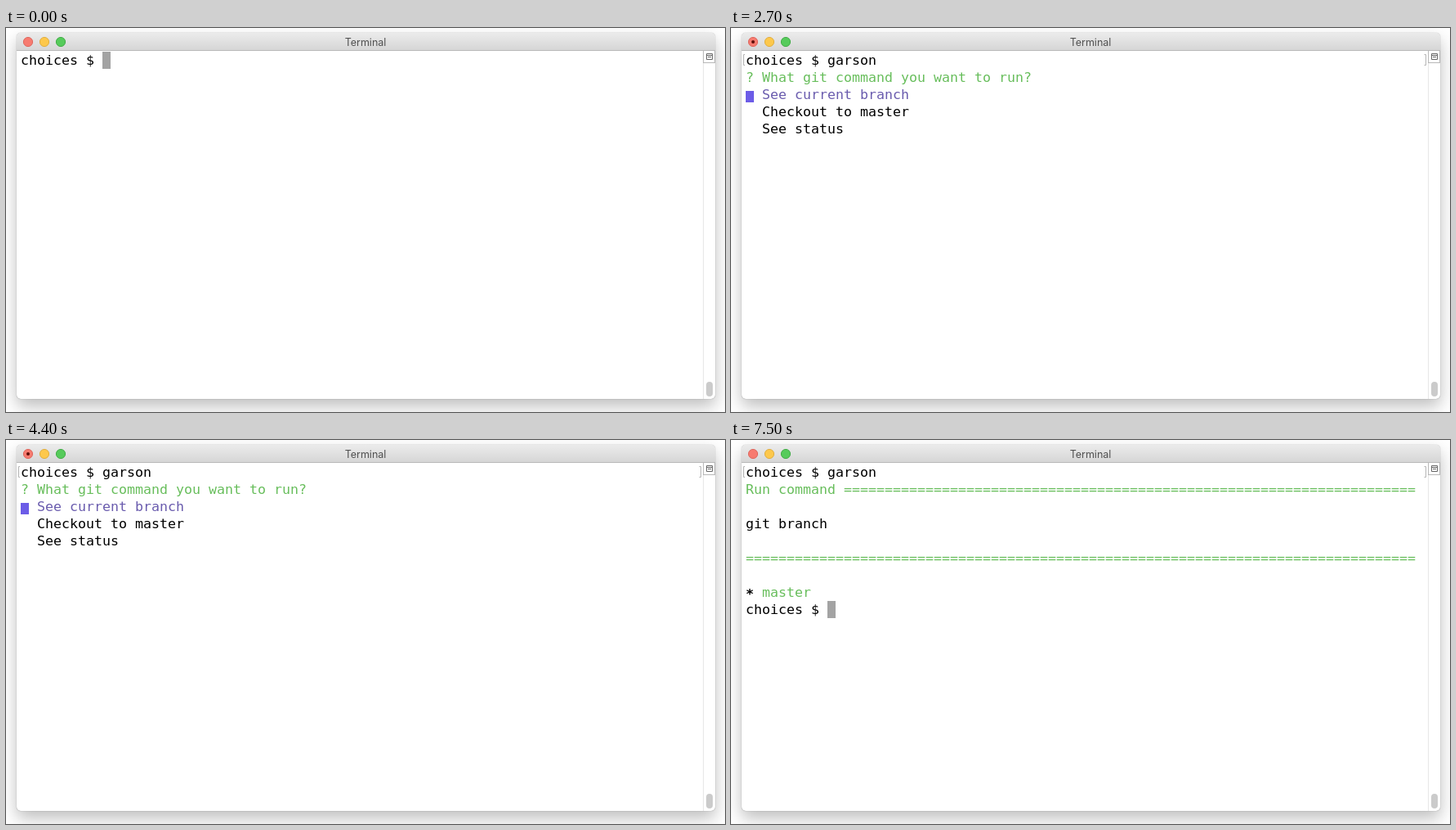
These frames come from a looping animation (880 px wide and 470 px high, 7.6 s). An HTML page:

```html
<!DOCTYPE html>
<html lang="en">
<head>
<meta charset="utf-8">
<title>Terminal</title>
<style>
html, body { margin: 0; width: 100%; height: 100%; overflow: hidden; background: #fff; }
#win {
  position: absolute; left: 13px; top: 6px; width: 855px; height: 448px;
  border-radius: 5px; background: #fff;
  box-shadow: 0 0 1px rgba(0,0,0,.5), 0 9px 20px rgba(0,0,0,.26);
}
svg { position: absolute; left: 0; top: 0; display: block; }
#screen text { font: 16.61px "DejaVu Sans Mono", monospace; white-space: pre; }
</style>
</head>
<body>
<div id="win"></div>
<svg width="880" height="470" viewBox="0 0 880 470">
  <defs>
    <linearGradient id="bar" x2="0" y2="1">
      <stop offset="0" stop-color="#ebebeb"/><stop offset="1" stop-color="#d6d6d6"/>
    </linearGradient>
  </defs>
  <path d="M13 27V11a5 5 0 0 1 5-5H863a5 5 0 0 1 5 5V27z" fill="url(#bar)"/>
  <path d="M13 27.5H868" stroke="#b9b9b9"/>
  <g stroke-width="1">
    <circle cx="27" cy="17" r="5.6" fill="#f77b70" stroke="#df665d"/>
    <circle cx="47" cy="17" r="5.6" fill="#fdc84c" stroke="#e0ae40"/>
    <circle cx="67" cy="17" r="5.6" fill="#56cb5b" stroke="#42ad47"/>
  </g>
  <circle id="dot" cx="27" cy="17" r="2" fill="#5c0d08"/>
  <text x="440" y="22" text-anchor="middle" fill="#505050" style="font:12.5px Inter,sans-serif">Terminal</text>

  <path d="M853.5 28V454" stroke="#e7e7e7"/>
  <rect x="853.5" y="27.5" width="14" height="15" fill="#fff" stroke="#b8b8b8"/>
  <path d="M857.5 31.5h7v7h-7zM857 33.5h8M859 35.5h4" fill="none" stroke="#666"/>
  <rect x="857" y="433" width="8" height="18" rx="4" fill="#cbcbcb"/>
  <g id="screen"></g>
</svg>
<script>
const LOOP = 7600, CELL = 10, ROW = 21, LEFT = 18, TOP = 29;
const GREEN = '#68be5c', PURPLE = '#6a5cae', BULLET = '#6c5ce7', GREY = '#a3a3a3';
const KEYS = [100, 200, 400, 500, 700, 800];
const ENTER = 1000, MENU = 1500, RUN = 4500, IDLE = 5000;
const MOVES = [[2800, 1], [3200, 2], [3400, 1], [3700, 0]];
const ITEMS = ['See current branch', 'Checkout to master', 'See status'];
const PROMPT = 'choices $ ';

const screen = document.getElementById('screen');
const dot = document.getElementById('dot');

const put = (row, col, str, fill = '#000', extra = '') =>
  `<text x="${LEFT + col * CELL}" y="${TOP + row * ROW + 16}" fill="${fill}" ${extra}>${str}</text>`;
const block = (row, col, fill = GREY, inset = 0) =>
  `<rect x="${LEFT + col * CELL}" y="${TOP + row * ROW + inset}" width="10" height="${ROW - inset - (inset ? 1 : 0)}" fill="${fill}"/>`;

function menu(t) {
  const picked = MOVES.reduce((now, [at, item]) => t >= at ? item : now, 0);
  return put(1, 0, '? What git command you want to run?', GREEN) +
    ITEMS.map((item, i) => put(i + 2, 2, item, i === picked ? PURPLE : '#000')).join('') +
    block(picked + 2, 0, BULLET, 6);
}

function result() {
  return put(1, 0, 'Run command ' + '='.repeat(70), GREEN) +
    put(3, 0, 'git branch') +
    put(5, 0, '='.repeat(82), GREEN) +
    put(7, 0, '*', '#000', 'dy="2" style="font-weight:bold"') +
    put(7, 2, 'master', GREEN) +
    put(8, 0, PROMPT) + block(8, 10);
}

function view(t) {
  const typed = KEYS.filter(at => t >= at).length;
  const line = put(0, 0, PROMPT + 'garson'.slice(0, typed));
  if (t < ENTER) return line + block(0, 10 + typed);
  const marks = '<path d="M17 32.5h-1.5v13H17M848.5 32.5h2v13h-2" fill="none" stroke="#b4b4b4"/>';
  const body = t < MENU ? block(1, 0) : t < RUN ? menu(t) : result();
  return marks + line + body;
}

let shown;
function frame() {
  const t = performance.now() % LOOP;
  const html = view(t);
  if (html !== shown) screen.innerHTML = shown = html;
  dot.style.display = t >= ENTER && t < IDLE ? '' : 'none';
  requestAnimationFrame(frame);
}
frame();
</script>
</body>
</html>
```
